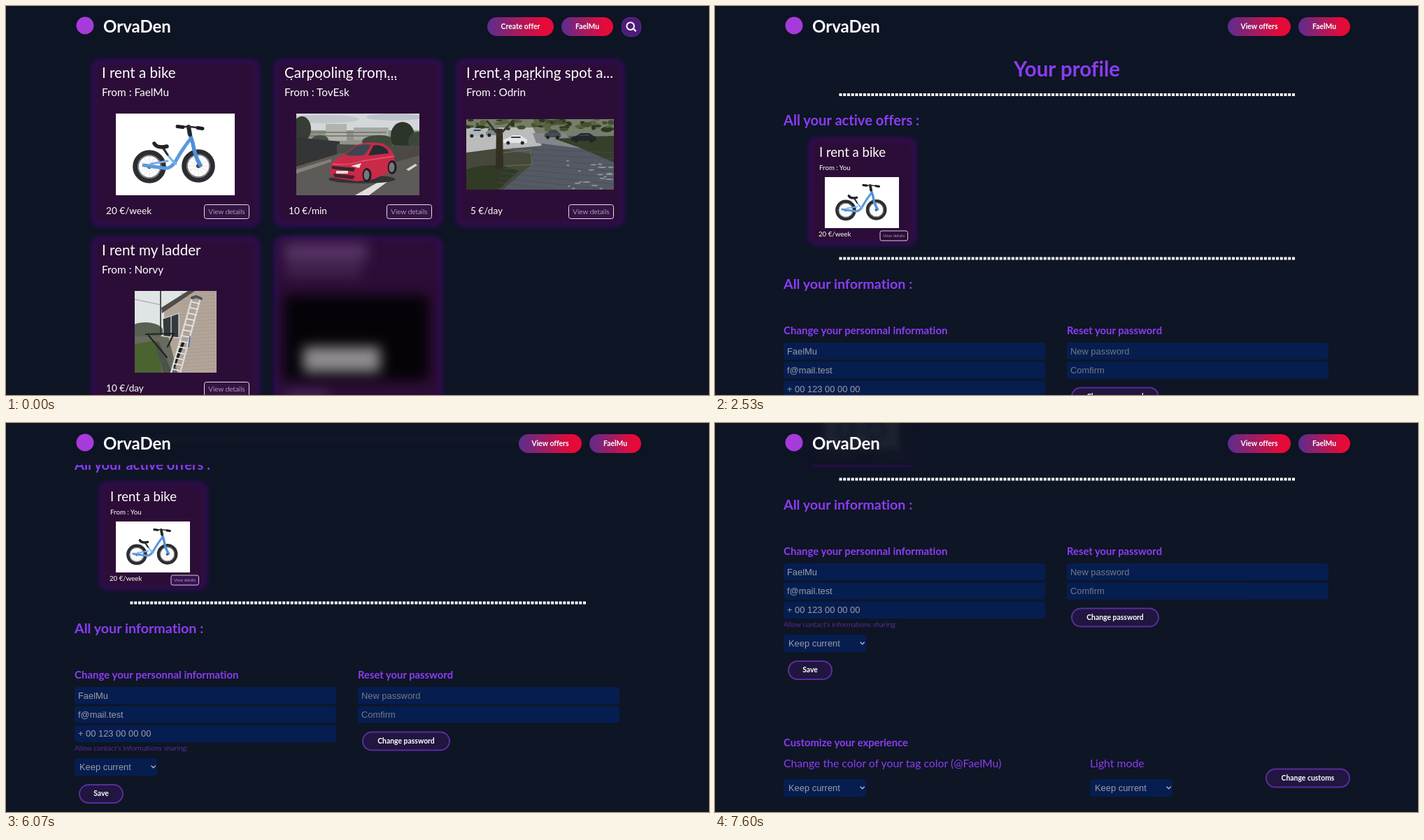
Animation of 1005x557 px, one loop 8000 ms. Source, as an HTML page:

```html
<!DOCTYPE html>
<html lang="en">
<head>
<meta charset="utf-8">
<title>Rental offers</title>
<style>
  html, body { margin: 0; width: 100%; height: 100%; overflow: hidden; background: #0e1524; }
  #stage { position: relative; width: 1005px; height: 557px; overflow: hidden; }
  svg { display: block; font-family: Lato, sans-serif; font-variant-ligatures: none; fill: #fff; }
  #stage > svg { position: absolute; left: 0; top: 0; }
  #veil { position: absolute; width: 1005px; height: 60px; background: rgba(14, 21, 36, .94); backdrop-filter: blur(5px); }
  .b { font-weight: 700; }
  .light { font-weight: 300; }
  .m { text-anchor: middle; }
  .p { fill: #8b3cf5; }
  .form { font-family: "Liberation Sans", Arial, sans-serif; font-size: 12.9px; fill: #9c9da3; }
  .hint { fill: #747983; }
  .url { font-family: "Open Sans", sans-serif; }
  .line { fill: none; stroke-linecap: round; stroke-linejoin: round; }
</style>
</head>
<body>
<div id="stage">
  <svg id="content" width="1005" height="557"></svg>
  <div id="veil"></div>
  <svg id="header" width="1005" height="557"></svg>
</div>
<script>
const $ = id => document.getElementById(id);
const USER = 'FaelMu';

// ---------- drawing helpers ----------
const text = (x, y, size, str, cls = '') =>
  `<text x="${x}" y="${y}" font-size="${size}" class="${cls}">${str}</text>`;
const rect = (x, y, w, h, fill, more = '') =>
  `<rect x="${x}" y="${y}" width="${w}" height="${h}" fill="${fill}" ${more}/>`;
const shape = (d, fill) => `<path d="${d}" fill="${fill}"/>`;
const line = (d, color, width) =>
  `<path class="line" d="${d}" stroke="${color}" stroke-width="${width}"/>`;
const blob = (x, y, rx, ry, fill) =>
  `<ellipse cx="${x}" cy="${y}" rx="${rx}" ry="${ry}" fill="${fill}"/>`;
const frame = (x, y, w, h, scene, scale = 1) =>
  `<svg x="${x}" y="${y}" width="${w * scale}" height="${h * scale}" viewBox="0 0 ${w} ${h}">${scene}</svg>`;

const pill = (x, y, w, h, label, fill, more = '') =>
  rect(x, y, w, h, fill, `rx="${h / 2}" ${more}`) +
  text(x + w / 2, y + h / 2 + 3, 10.4, label, 'b m');
const outlinePill = (x, y, w, label) =>
  pill(x + 1, y + 1, w - 2, 26, label, '#211640', 'stroke="#592d9c" stroke-width="2"');

// ---------- pictures ----------
function wheel(x, y) {
  let spokes = '';
  for (let i = 0; i < 12; i++) {
    const a = i * Math.PI / 6;
    spokes += `M${x} ${y}l${15 * Math.cos(a)} ${15 * Math.sin(a)}`;
  }
  return line(spokes, '#c9ccd0', .6) +
    `<circle cx="${x}" cy="${y}" r="20.3" fill="none" stroke="#2b2d30" stroke-width="7"/>` +
    `<circle cx="${x}" cy="${y}" r="16" fill="none" stroke="#696c70" stroke-width="1.5"/>` +
    blob(x, y, 3, 3, '#39424c');
}
const bike = rect(0, 0, 170, 117, '#fff') + wheel(48, 76) + wheel(118, 75) +
  line('M40 74L68 78Q78 80 85 69Q95 51 107 36', '#5a9ade', 5) +
  line('M70 51Q74 62 86 72M50 72L74 68', '#78b0ea', 3) +
  line('M105 27L110 42Q113 62 121 74', '#4f8fd6', 5.5) +
  line('M67 49L74 59', '#2b2d30', 3) +
  line('M55 43Q59 50 73 47', '#222427', 5.5) +
  line('M104 19L106 30', '#26282b', 6) +
  line('M89 19Q105 18 123 21', '#2b2d30', 2.5) +
  line('M88 18.5L96 19.5M117 20.5L124 21.5', '#1c1e20', 5);

const tyre = (x, y) => blob(x, y, 6.5, 10, '#1d1d20') + blob(x - .5, y, 4, 7, '#77787c');
const car = rect(0, 0, 176, 117, '#d3d7da') +
  blob(40, 8, 50, 6, '#c0c6cb') + blob(140, 5, 40, 5, '#bcc3c9') +
  rect(0, 24, 176, 30, '#8f938c') + rect(42, 15, 30, 24, '#b3b3ab') + rect(82, 20, 50, 18, '#a5a8a2') +
  line('M20 27H128M20 32H128', '#6d7268', 1.5) +
  blob(8, 22, 13, 18, '#353d35') + blob(34, 38, 12, 7, '#465043') + blob(118, 40, 24, 9, '#3f4a3d') +
  blob(152, 32, 17, 20, '#2b3529') + blob(174, 40, 14, 14, '#3d4737') +
  shape('M0 34L62 40V62L0 78Z', '#343536') + shape('M58 44L176 46V60H58Z', '#4a4c47') +
  shape('M0 76L62 57L176 54V117H0Z', '#5e5a58') +
  shape('M0 80L50 65V69L0 86Z', '#86807a') + shape('M128 56L176 50V60L140 70Z', '#4d4844') +
  shape('M84 117L128 92H138L104 117Z', '#e0dfdc') + shape('M157 80L170 72L173 74L161 82Z', '#d4d2cd') +
  blob(94, 94, 48, 6, '#333235') +
  shape('M49 77Q52 64 69 59L84 46Q98 39 124 43L136 52Q143 66 140 82L110 94L87 97L53 92Q47 86 49 77Z', '#c92a48') +
  shape('M70 59L85 47Q95 43 107 45L98 59Q84 62 70 59Z', '#3b4652') +
  shape('M103 60L110 46Q122 43 131 53L132 57Z', '#252b33') +
  line('M52 72Q72 75 94 68L140 61', '#e45a70', 1.3) +
  shape('M51 75L84 78L82 83L51 79Z', '#31272d') + shape('M52 86L84 89L81 94L55 91Z', '#42232e') +
  shape('M78 75L93 71L90 78Z', '#e7e6e8') + rect(57, 82, 17, 4, '#ddd') + tyre(101, 88) + tyre(137, 77);

const parkedCar = (x, y, w, color) =>
  shape(`M${x} ${y}l${w * .2} -2l${w * .18} -4h${w * .34}l${w * .17} 4l${w * .11} 2v5h${-w}Z`, color) +
  line(`M${x + w * .35} ${y - 3}h${w * .35}`, '#34414a', 2) +
  blob(x + w * .2, y + 5, 2.5, 2.5, '#222') + blob(x + w * .8, y + 5, 2.5, 2.5, '#222');
let paving = '', leaves = '', specks = '';
for (let i = 0; i < 9; i++) paving += `M${65 - i * 3} ${42 + i * 7}L211 ${48 + i * 9}`;
for (let i = 0; i < 60; i++) {
  const r = k => Math.abs(Math.sin(i * k) * 997) % 1;
  leaves += blob(r(1.7) * 211, r(2.3) * 15, 2 + r(3.1) * 7, 1 + r(4.7) * 3, ['#454f30', '#2c3720', '#59633f'][i % 3]);
  if (i < 22) specks += blob(145 + r(5.3) * 64, 60 + r(6.1) * 40, 2 + r(1.9) * 4, 1, '#8e949f');
}
const parking = rect(0, 0, 211, 101, '#545963') + rect(0, 0, 211, 24, '#767d6a') +
  shape('M0 12H95L108 38L0 48Z', '#b9bcba') + shape('M95 20H140L165 42L100 34Z', '#82878b') + leaves +
  shape('M126 28L211 24V62L165 42Z', '#363f29') +
  shape('M0 48L45 42L95 50L92 66L52 101H0Z', '#45483a') +
  shape('M0 72Q38 59 75 74L46 101H0Z', '#303a25') +
  line(paving, '#474c57', .7) + specks +
  parkedCar(3, 19, 24, '#aeb5bb') + parkedCar(28, 18, 24, '#7d8790') +
  parkedCar(53, 29, 34, '#e4e6e6') + parkedCar(112, 21, 23, '#454b51') + parkedCar(150, 26, 36, '#22282d') +
  line('M44 49L92 44L94 65L56 67', '#77733a', 1) +
  shape('M43 14H52L53 69L42 72Z', '#332e22') + line('M47 24L30 3M48 22L67 2', '#3a3525', 3);

let bricks = '', rungs = '';
for (let y = 4; y < 117; y += 5) bricks += `M66 ${y}L117 ${y - 3}`;
for (let i = 0; i < 13; i++) rungs += `M${82 - i * 2.4} ${16 + i * 8}l10 2`;
const ladder = rect(0, 0, 117, 117, '#dfe4e5') +
  blob(15, 58, 26, 13, '#596152') + line('M37 0V60', '#303532', 1.7) + line('M0 12L38 20', '#697174', .6) +
  shape('M42 30L82 0H117V117H59L43 78Z', '#b2a598') + line(bricks, '#a6998d', .8) +
  shape('M38 24L76 0H86L39 32Z', '#504d4a') +
  shape('M0 65H48L61 117H0Z', '#686a5e') + shape('M0 76L31 71L39 117H0Z', '#496331') +
  shape('M29 75L34 72L54 117H41Z', '#4b524b') +
  shape('M40 40L63 32V67L41 65Z', '#343b40') + line('M40 40L63 32V67L41 65ZM52 36V66', '#d7d4ce', 1.3) +
  line('M16 62L56 61L47 80M20 64L46 95', '#202321', 2.2) + line('M69 75L56 108', '#1d1e1e', 4) +
  line('M82 10L52 117M94 10L65 117', '#d6d9db', 2.5) + line(rungs, '#eceeee', 1.6) +
  line('M82 10L88 8L95 11', '#4c555b', 4) + line('M79 65L77 80', '#3a68ac', 1.6);

// ---------- cards ----------
const panel = (x, y, w, h) =>
  rect(x - 2, y - 2, w + 4, h + 4, '#330c59', 'rx="13" style="filter:blur(3.5px)"') +
  rect(x + 3, y + 3, w - 6, h - 6, '#2c0d37', 'rx="9" style="filter:blur(3.5px)"');

const offer = (x, y, title, owner, price, picture, overflow = '') => panel(x, y, 237, 236) +
  text(x + 13, y + 25, 20.6, title) +
  (overflow && `<svg x="${x + 13}" y="${y + 26}" width="210" height="2">${text(0, 15.8, 20.6, overflow)}</svg>`) +
  text(x + 13, y + 51, 15.4, 'From : ' + owner) + picture +
  text(x + 19, y + 220, 13.6, price) +
  rect(x + 159.5, y + 206.5, 64, 20, '#351344', 'rx="3" stroke="#e6deeb"') +
  text(x + 191.5, y + 220, 10.1, 'View details', 'm light');

const hiddenOffer = panel(385, 332, 237, 236) +
  `<g style="filter:blur(9px)">
    ${rect(398, 340, 118, 24, '#573567')}${rect(400, 368, 108, 20, '#44234f')}
    ${rect(398, 414, 206, 122, '#050307')}${rect(425, 488, 110, 36, '#8f8c8f')}
    ${rect(400, 552, 60, 12, '#533060')}
  </g>`;

const offersPage =
  offer(124, 78, 'I rent a bike', USER, '20 €/week', frame(157, 154, 170, 117, bike)) +
  offer(385, 78, 'Carpooling from...', 'TovEsk', '10 €/min', frame(415, 154, 176, 117, car), 'the lake to the hills') +
  offer(645, 78, 'I rent a parking spot a...', 'Odrin', '5 €/day', frame(658, 162, 211, 101, parking), 'the old mill') +
  offer(124, 332, 'I rent my ladder', 'Norvy', '10 €/day', frame(184, 408, 117, 117, ladder)) +
  hiddenOffer;

// ---------- profile ----------
const dots = y => `<path d="M177.5 ${y}H829" stroke="#fff" stroke-width="4" stroke-dasharray="4 1.73"/>`;
const field = (x, y, value, cls = '') => rect(x, y, 374, 24.5, '#061d50', 'rx="4"') +
  `<text x="${x + 5}" y="${y + 16.5}" class="form ${cls}">${value}</text>`;
const select = (x, y) => rect(x, y, 118, 25, '#061d50', 'rx="4"') +
  `<text x="${x + 7}" y="${y + 17}" class="form">Keep current</text>` +
  line(`M${x + 110} ${y + 11}l2.7 2.7l2.7 -2.7`, '#b5b8c0', 1.4);

const profilePage =
  text(503, 101, 29.5, 'Your profile', 'b p m') + dots(127) +
  text(98, 171, 20.1, 'All your active offers :', 'b p') +
  panel(135, 190, 151, 151) +
  text(149, 216, 18.5, 'I rent a bike') + text(149, 235, 9.7, 'From : You') +
  frame(157, 245, 170, 117, bike, .624) + text(148, 330, 9.7, '20 €/week') +
  rect(236, 322, 39.5, 14, '#2b0d36', 'rx="2.5" stroke="#d9cfe0"') +
  rect(236.5, 322.5, 38.5, 13, '#8b3cf5', 'rx="2" id="detailsFill"') +
  text(255.7, 331, 6, 'View details', 'm light') +
  dots(361.5) + text(98, 405, 19.7, 'All your information :', 'b p') +
  text(98, 470, 15, 'Change your personnal information', 'b p') +
  field(98, 482, USER) + field(98, 509.3, 'f@mail.test') + field(98, 536.6, '+ 00 123 00 00 00') +
  text(98, 573, 10.3, "Allow contact's informations sharing:", 'p light') +
  select(98, 584) + outlinePill(104, 621, 64, 'Save') +
  text(503, 470, 14.8, 'Reset your password', 'b p') +
  field(503, 482, 'New password', 'hint') + field(503, 509.3, 'Comfirm', 'hint') +
  outlinePill(509, 545.5, 126, 'Change password') +
  text(98, 744, 14.8, 'Customize your experience', 'b p') +
  text(98, 774, 15.8, `Change the color of your tag color (@${USER})`, 'p') + select(98, 791) +
  text(536, 774, 15.8, 'Light mode', 'p') + select(536, 791) +
  outlinePill(787, 775.5, 121, 'Change customs');

// ---------- header ----------
const gradient = id => `<linearGradient id="${id}" x1="0" x2="2">
  <stop offset="0" stop-color="#5b2d8e"/><stop offset=".42" stop-color="#e60a38"/>
  <stop offset=".62" stop-color="#e60a38"/><stop offset="1" stop-color="#0c3060"/></linearGradient>`;
const menuStyle = 'stroke="#6b35b9" stroke-width="1.3"';

$('content').innerHTML = `<g id="offers">${offersPage}</g><g id="profile">${profilePage}</g>`;
$('header').innerHTML = `<defs>${gradient('warm')}${gradient('live')}</defs>
  <circle cx="113" cy="28" r="12.5" fill="#a63adb"/>
  ${text(139, 38, 24, 'OrvaDen', 'b')}
  <g id="offersNav">
    ${pill(688, 16, 95, 27, 'Create offer', 'url(#warm)')}
    ${pill(794, 16, 74, 27, USER, 'url(#live)')}
    ${rect(880.5, 16.5, 27, 27, '#4c1c78', 'rx="11" stroke="#642d96"')}
    ${line('M897.5 33L900 35.7', '#fff', 2.2)}
    <circle cx="892.7" cy="28.7" r="5.3" fill="none" stroke="#fff" stroke-width="2"/>
    <g id="menu">
      ${pill(806.5, 48.5, 49, 27, 'Profile', '#4f2189', menuStyle)}
      <g id="menuHover">${pill(806, 48, 50, 28, 'Profile', '#8b3cf5')}</g>
      ${pill(795, 83, 73, 27.5, 'Disconnect', '#4f2189', menuStyle)}
    </g>
    <g id="status">${rect(0, 546, 119, 11, '#171a20')}${text(0, 555, 8.6, 'https://localhost:4000/profile', 'url')}</g>
  </g>
  <g id="profileNav">
    ${pill(733, 16, 90, 27, 'View offers', 'url(#warm)')}
    ${pill(834, 16, 74, 27, USER, 'url(#warm)')}
  </g>`;

// ---------- motion ----------
// Progress that advances in n held steps; the first step is already under way at `from`.
function held(t, from, to, n) {
  if (t < from) return 0;
  const k = Math.min(n - 1, Math.floor((t - from) / (to - from) * (n - 1) + 1e-6));
  return (k + .9) / (n - .1);
}
const easeInOut = u => (1 - Math.cos(Math.PI * u)) / 2;
const easeOut = u => 1 - (1 - u) ** 3;
const show = (id, on) => { $(id).style.display = on ? '' : 'none'; };
const fade = (id, value) => { $(id).style.opacity = value; };

const TICK = 70.25, LOOP = 8000;

function render(t) {
  const onOffers = t < 2330;
  for (const id of ['offers', 'offersNav']) show(id, onOffers);
  for (const id of ['profile', 'profileNav']) show(id, !onOffers);

  const shift = easeOut(held(t, 130, 670, 9));
  $('live').setAttribute('x1', -shift);
  $('live').setAttribute('x2', 2 - shift);
  fade('menu', easeOut(held(t, 130, 400, 5)));
  fade('menuHover', easeOut(held(t, 870, 1270, 7)));
  show('status', t >= 870);

  const scroll = TICK * (easeInOut(held(t, 4130, 4330, 4)) +
    easeInOut(held(t, 6000, 6200, 4)) + 2 * easeInOut(held(t, 6730, 7130, 7)));
  $('profile').setAttribute('transform', `translate(0 ${-scroll})`);
  fade('detailsFill', easeOut(held(t, 5200, 5600, 7)) * (1 - easeOut(held(t, 6000, 6200, 4))));
}

const start = performance.now();
function tick() {
  render((performance.now() - start) % LOOP);
  requestAnimationFrame(tick);
}
tick();
</script>
</body>
</html>
```
